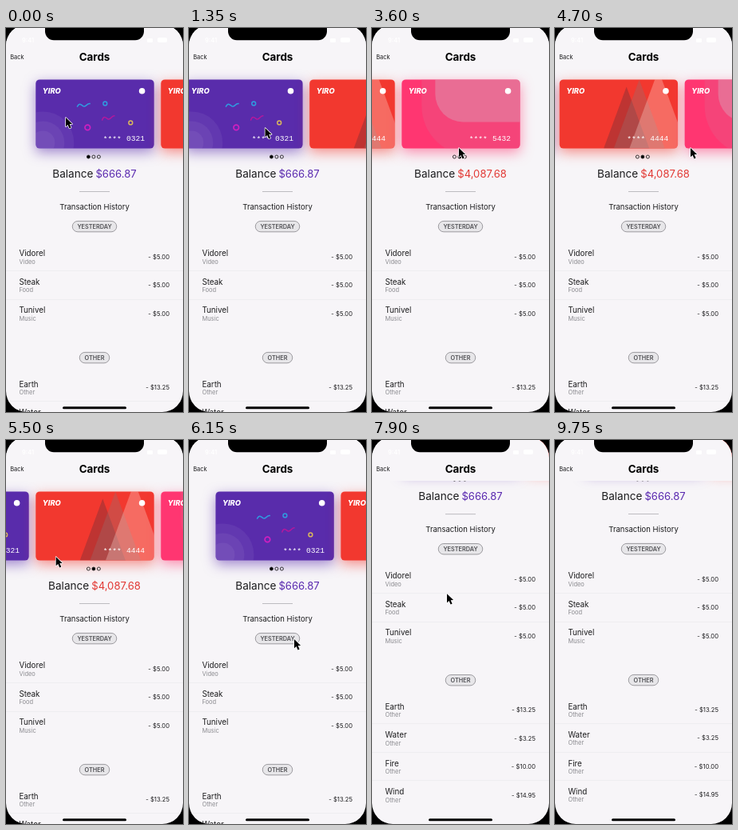
Animation of 222 by 480 pixels, one loop 9800 ms. Source, as an HTML page with a canvas:

```html
<!DOCTYPE html>
<html lang="en">
<head>
<meta charset="utf-8">
<title>Cards</title>
<style>
html, body { margin: 0; width: 100%; height: 100%; overflow: hidden; background: #000; }
canvas { display: block; width: 222px; height: 480px; }
</style>
</head>
<body>
<canvas id="stage"></canvas>
<script>
const W = 222, H = 480, LOOP = 9800;
const PAPER = '#f7f5f8', INK = '#1c1c1e', PURPLE = '#592cab', RED = '#f2382f', PINK = '#ff3671';
const SANS = 'Inter, sans-serif', MONO = '"Liberation Mono", monospace';
const PITCH = 157, CARD_X = 37.3, CARD_Y = 64.4, CARD_W = 148.4, CARD_H = 86.2;

const canvas = document.getElementById('stage');
const c = canvas.getContext('2d');
const ratio = window.devicePixelRatio || 1;
canvas.width = W * ratio;
canvas.height = H * ratio;

// Pointer tip: time, x, y
const pointer = [
  [0, 75, 112], [400, 84, 115], [1150, 176, 122], [1450, 68, 126], [2200, 152, 110],
  [2650, 172, 114], [2950, 62, 132], [3600, 109, 150], [3950, 92, 150], [4320, 62, 150],
  [4700, 170, 150], [5200, 80, 145], [5540, 62, 146], [5800, 165, 152], [6150, 132, 249],
  [6700, 116, 297], [7050, 108, 286], [7250, 103, 212], [7450, 101, 165],
  [8100, 92, 200], [8800, -16, 300], [LOOP, -16, 300]
];

// Swipes: start, duration, from page, to page
const swipes = [[1280, 700, 0, 1], [2720, 700, 1, 2], [4370, 800, 2, 1], [5584, 800, 1, 0]];

const clamp = v => Math.max(0, Math.min(1, v));
const easeOut = (t, start, duration) => 1 - (1 - clamp((t - start) / duration)) ** 3;

function pageAt(t) {
  let page = 0;
  for (const [start, duration, from, to] of swipes)
    if (t >= start) page = from + (to - from) * easeOut(t, start, duration);
  return page;
}

function pointerAt(t) {
  const i = pointer.findIndex(k => k[0] > t);
  const [t0, x0, y0] = pointer[i - 1], [t1, x1, y1] = pointer[i];
  let p = (t - t0) / (t1 - t0);
  p = p * p * (3 - 2 * p);
  return [x0 + (x1 - x0) * p, y0 + (y1 - y0) * p];
}

function text(str, x, y, size, { color = INK, weight = 400, align = 'left', family = SANS } = {}) {
  c.font = `${weight} ${size}px ${family}`;
  c.fillStyle = color;
  c.textAlign = align;
  c.fillText(str, x, y);
}

function box(x, y, w, h, r, fill, stroke) {
  c.beginPath();
  c.roundRect(x, y, w, h, r);
  if (fill) { c.fillStyle = fill; c.fill(); }
  if (stroke) { c.strokeStyle = stroke; c.lineWidth = 0.8; c.stroke(); }
}

function disc(x, y, r, fill, stroke, width = 1) {
  c.beginPath();
  c.arc(x, y, r, 0, Math.PI * 2);
  if (fill) { c.fillStyle = fill; c.fill(); }
  if (stroke) { c.strokeStyle = stroke; c.lineWidth = width; c.stroke(); }
}

// Triangle with its apex at x, y and sides running off the card
function peak(x, y, fill) {
  const half = (CARD_H - y) * 0.37;
  c.beginPath();
  c.moveTo(x, y);
  c.lineTo(x - half, CARD_H);
  c.lineTo(x + half, CARD_H);
  c.fillStyle = fill;
  c.fill();
}

function rule(x0, x1, y, color) {
  c.fillStyle = color;
  c.fillRect(x0, y, x1 - x0, 1);
}

function squiggle(x, y, angle, color) {
  c.save();
  c.translate(x, y);
  c.rotate(angle);
  c.beginPath();
  c.moveTo(-8, 1);
  c.bezierCurveTo(-5, -4, -3, -1, -1, 1);
  c.bezierCurveTo(2, 4, 4, -2, 8, -1);
  c.strokeStyle = color;
  c.lineWidth = 1.5;
  c.lineCap = 'round';
  c.stroke();
  c.restore();
}

function purpleArt() {
  for (const r of [39, 27, 15]) disc(9, 79, r, 'rgba(255,255,255,.055)');
  squiggle(60, 32, -0.1, '#2f9be0');
  squiggle(91, 48, -0.2, '#b5179e');
  disc(87, 30, 2.4, null, '#2f9be0', 1.5);
  disc(65, 60, 3.3, null, '#d01fc0', 1.7);
  disc(119, 54, 2.4, null, '#d9b75b', 1.5);
}

function redArt() {
  peak(84, 9, 'rgba(110,45,55,.4)');
  peak(100, 0, 'rgba(150,110,110,.36)');
  peak(124, -12, 'rgba(255,225,215,.3)');
}

function pinkArt() {
  box(25, -80, 220, 175, 62, 'rgba(220,100,140,.3)');
  box(42, -80, 220, 133, 35, 'rgba(215,165,185,.42)');
}

const cards = [
  { color: PURPLE, glow: 'rgba(89,44,171,.55)', digits: '0321', art: purpleArt },
  { color: RED, glow: 'rgba(242,56,47,.55)', digits: '4444', art: redArt },
  { color: PINK, glow: 'rgba(255,54,113,.55)', digits: '5432', art: pinkArt }
];

function drawCard(card, x) {
  c.save();
  c.translate(x, CARD_Y);
  c.save();
  c.shadowColor = card.glow;
  c.shadowBlur = 16 * ratio;
  c.shadowOffsetY = 5 * ratio;
  box(0, 0, CARD_W, CARD_H, 5, card.color);
  c.restore();
  c.save();
  c.beginPath();
  c.roundRect(0, 0, CARD_W, CARD_H, 5);
  c.clip();
  card.art();
  c.restore();
  const white = { color: '#fff', family: MONO };
  text('YIRO', 8.5, 17.4, 9.3, { color: '#fff', weight: 'italic 800' });
  disc(133.3, 14.4, 3.8, '#fff');
  text('****', 84.5, 78, 9.6, white);
  text(card.digits, 136.7, 76.2, 9.6, { ...white, align: 'right' });
  c.restore();
}

function pill(label, y, width) {
  box(111 - width / 2, y - 6.6, width, 13.4, 6.7, '#e7e6e9', '#87868b');
  text(label, 111, y + 2.9, 7.3, { color: '#505054', weight: 600, align: 'center' });
}

function rows(items, y) {
  items.forEach(([name, kind, price], i) => {
    const top = y + i * 35.5;
    text(name, 16.4, top + 3.3, 9.8);
    text(kind, 16.4, top + 12.6, 7.5, { color: '#8a8a8f' });
    text('- $' + price, 205, top + 6.6, 7.7, { align: 'right' });
    if (i < items.length - 1) rule(0, W, Math.round(top + 21), '#eeedf0');
  });
}

function balance(second) {
  const amount = second ? '$4,087.68' : '$666.87';
  c.font = `400 13.6px ${SANS}`;
  const labelW = c.measureText('Balance').width;
  c.font = `400 13.1px ${SANS}`;
  const left = 111 - (labelW + 3 + c.measureText(amount).width) / 2;
  text('Balance', left, 187.3, 13.6);
  text(amount, left + labelW + 3, 187.3, 13.1, { color: second ? '#e23a35' : '#5b2bb0' });
}

function content(t) {
  const page = pageAt(t);
  const second = t >= 2350 && t < 5900;
  cards.forEach((card, i) => drawCard(card, CARD_X + (i - page) * PITCH));
  for (let i = 0; i < 3; i++)
    disc(103.4 + i * 6.5, 161, 2, i === (second ? 1 : 0) ? '#000' : null, '#222', 0.9);
  balance(second);
  rule(92, 130, 204, '#bdbcc0');
  text('Transaction History', 111, 227, 9.5, { align: 'center' });
  pill('YESTERDAY', 248, 55.5);
  rows([['Vidorel', 'Video', '5.00'], ['Steak', 'Food', '5.00'], ['Tunivel', 'Music', '5.00']], 282);
  pill('OTHER', 412, 37.5);
  rows([['Earth', 'Other', '13.25'], ['Water', 'Other', '3.25'],
        ['Fire', 'Other', '10.00'], ['Wind', 'Other', '14.95']], 445.3);
}

function header() {
  c.fillStyle = PAPER;
  c.fillRect(0, 0, W, 51);
  text('Back', 5.2, 39, 7.4);
  text('Cards', 111, 41.3, 13.4, { weight: 700, align: 'center', color: '#000' });
  text('9:41', 20, 18, 7.5, { weight: 600, color: '#fff' });
  box(177, 13, 7, 5, 1, '#fff');
  box(190, 12, 12, 6, 2, '#fff');
  box(49, -20, 124, 35.3, 11, '#000');
}

function arrow(x, y) {
  c.save();
  c.translate(x, y);
  c.scale(0.92, 0.92);
  c.beginPath();
  [[0, 0], [0, 12.2], [2.8, 9.7], [5, 14.6], [7.2, 13.6], [5.1, 8.8], [8.8, 8.6]]
    .forEach(([px, py]) => c.lineTo(px, py));
  c.closePath();
  c.lineJoin = 'round';
  c.strokeStyle = '#fff';
  c.lineWidth = 1.6;
  c.stroke();
  c.fillStyle = '#000';
  c.fill();
  c.restore();
}

function draw(t) {
  c.setTransform(ratio, 0, 0, ratio, 0, 0);
  c.fillStyle = '#000';
  c.fillRect(0, 0, W, H);
  c.save();
  c.beginPath();
  c.roundRect(0, -4, W, H + 4, 26);
  c.clip();
  c.fillStyle = PAPER;
  c.fillRect(0, 0, W, H);
  c.save();
  c.translate(0, -112 * easeOut(t, 7100, 900));
  content(t);
  c.restore();
  header();
  box(71, 473.2, 80, 3, 1.5, '#000');
  c.restore();
  arrow(...pointerAt(t));
}

function frame() {
  draw(performance.now() % LOOP);
  requestAnimationFrame(frame);
}
frame();
</script>
</body>
</html>
```
